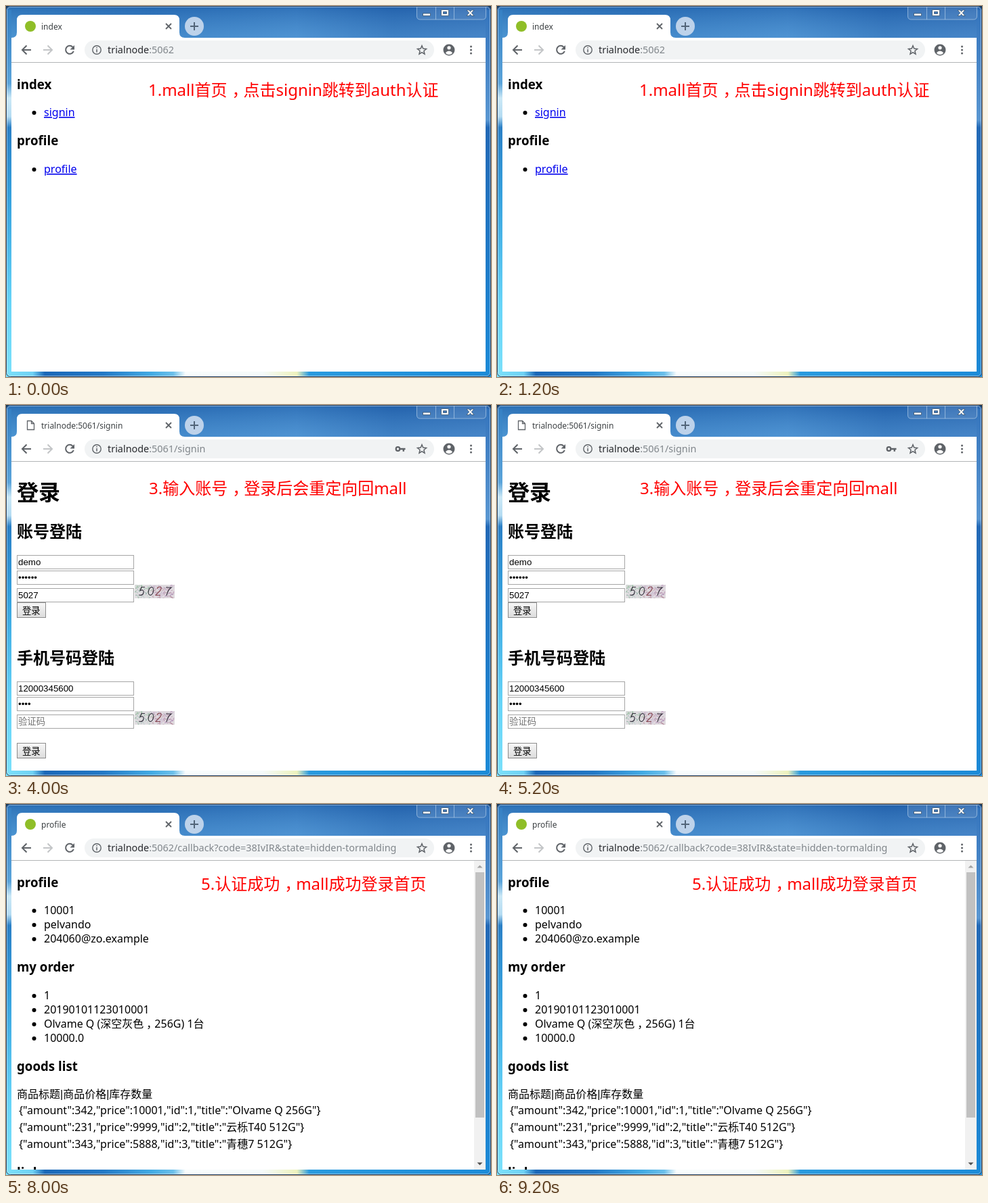
Write an HTML page that moves like this. It is 716 by 549 pixels and loops after 10 s.

```html
<!DOCTYPE html>
<html lang="zh-CN">
<head>
<meta charset="utf-8">
<title>Sign-in walkthrough</title>
<style>
html, body { margin: 0; width: 100%; height: 100%; overflow: hidden; background: #16324f; }
svg { display: block; width: 716px; height: 549px; }
text { font: 16px "Noto Sans", "Noto Sans CJK SC", "Noto Sans CJK", sans-serif; fill: #000; white-space: pre; }
.tab { font-size: 12px; fill: #3c4043; }
.url { font-size: 14.4px; fill: #80868b; }
.url tspan { fill: #27292d; }
.note { font-size: 24px; fill: #f00; }
.h1 { font-size: 32px; font-weight: 700; }
.h2 { font-size: 24px; font-weight: 700; }
.h3 { font-size: 18.72px; font-weight: 700; }
.link { fill: #00e; text-decoration: underline; }
.bar { font-family: "Liberation Sans", sans-serif; }
.field { font: 13.33px "Liberation Sans", "Noto Sans CJK SC", sans-serif; }
.hint { fill: #757575; }
.icon { fill: none; stroke: #5f6368; stroke-width: 1.8; }
.step, .pair { visibility: hidden; animation: step 10s calc(var(--at) * 1s - 10s) infinite step-end; }
.pair { animation-name: pair; }
@keyframes step { 0% { visibility: visible; } 20%, 100% { visibility: hidden; } }
@keyframes pair { 0% { visibility: visible; } 40%, 100% { visibility: hidden; } }
</style>
</head>
<body>
<svg viewBox="0 0 716 549">
  <defs>
    <linearGradient id="top">
      <stop offset="0" stop-color="#3a86c8"/><stop offset=".3" stop-color="#3179c0"/>
      <stop offset=".6" stop-color="#3f86ca"/><stop offset=".8" stop-color="#2c6fb8"/>
      <stop offset="1" stop-color="#3575bd"/>
    </linearGradient>
    <linearGradient id="shade" x2="0" y2="1">
      <stop offset="0" stop-color="#0a3f8c" stop-opacity=".3"/><stop offset="1" stop-color="#8cc8f4" stop-opacity=".2"/>
    </linearGradient>
    <linearGradient id="left" x2="0" y2="1">
      <stop offset="0" stop-color="#3580c4"/><stop offset=".2" stop-color="#5ba4da"/>
      <stop offset=".24" stop-color="#cbe8f6"/><stop offset=".29" stop-color="#b5dcf2"/>
      <stop offset=".32" stop-color="#2b80c6"/><stop offset=".5" stop-color="#35a0dd"/>
      <stop offset=".8" stop-color="#66d4f8"/><stop offset="1" stop-color="#7be0fa"/>
    </linearGradient>
    <linearGradient id="right" x2="0" y2="1">
      <stop offset="0" stop-color="#3575bd"/><stop offset=".3" stop-color="#5a97d2"/>
      <stop offset=".32" stop-color="#2369b6"/><stop offset="1" stop-color="#1c8bd8"/>
    </linearGradient>
    <linearGradient id="base">
      <stop offset="0" stop-color="#7be0fa"/><stop offset=".055" stop-color="#70d2f4"/>
      <stop offset=".08" stop-color="#1b68b8"/><stop offset=".2" stop-color="#2379c6"/>
      <stop offset=".3" stop-color="#43abe4"/><stop offset=".345" stop-color="#6cc0ea"/>
      <stop offset=".37" stop-color="#f8fcfd"/><stop offset=".53" stop-color="#f5fafa"/>
      <stop offset=".6" stop-color="#edf2bd"/><stop offset=".625" stop-color="#2a9bdf"/>
      <stop offset="1" stop-color="#1c8bd8"/>
    </linearGradient>
    <linearGradient id="fade">
      <stop offset="0" stop-color="#fff" stop-opacity="0"/><stop offset="1" stop-color="#fff"/>
    </linearGradient>
    <linearGradient id="face" x2="0" y2="1">
      <stop offset="0" stop-color="#f7f7f7"/><stop offset="1" stop-color="#dcdcdc"/>
    </linearGradient>
    <clipPath id="page"><rect x="8" y="84" width="700" height="457"/></clipPath>
    <clipPath id="title"><rect x="52" y="16" width="175" height="28"/></clipPath>
    <clipPath id="codeBox"><rect width="59" height="20"/></clipPath>

    <circle id="badge" cx="36" cy="30" r="8" fill="#8fbe28"/>
    <path id="sheet" class="icon" style="stroke-width:1.3" d="M31.5 23.5h6l4 4v9h-10zM37.5 23.5v4h4"/>
    <path id="star" class="icon" style="stroke-width:1.5" d="M614 58.8l1.8 4.3 4.7.4-3.6 3 1.1 4.6-4-2.5-4 2.5 1.1-4.6-3.6-3 4.7-.4z"/>
    <rect id="input" x="16.5" width="172" height="20" fill="#fff" stroke="#a5a5a5"/>
    <rect id="button" x="16.5" width="42" height="22" fill="url(#face)" stroke="#8c8c8c"/>
    <circle id="dot" cx="41.5" r="3"/>
    <g id="code" clip-path="url(#codeBox)">
      <rect width="59" height="20" fill="#dfdbdf"/>
      <g id="noise"></g>
      <g fill="none" stroke="#383440" stroke-width="1.2">
        <path d="M15 3.500h-5l-2 5c4-1.500 6 0 5 3.500s-4 4-7 3"/>
        <ellipse cx="24" cy="9.500" rx="3.500" ry="6" transform="rotate(16 24 9.500)"/>
        <path stroke="#864851" d="M33 6c1-4 7-4 6 0-1 4-6 6-8 9.500h7"/>
        <path d="M46 4h8c-4 3-6 7-7 12"/>
      </g>
    </g>
  </defs>

  <!-- window frame -->
  <rect width="716" height="549" rx="6" fill="url(#top)"/>
  <rect width="716" height="47" rx="6" fill="url(#shade)"/>
  <rect y="6" width="8" height="543" fill="url(#left)"/>
  <rect x="708" y="6" width="8" height="543" fill="url(#right)"/>
  <rect y="541" width="716" height="8" fill="url(#base)"/>
  <rect x=".5" y=".5" width="715" height="548" rx="6" fill="none" stroke="#1d3c60"/>
  <rect x="1.500" y="1.500" width="713" height="546" rx="5" fill="none" stroke="#fff" opacity=".45"/>
  <path d="M606.500 1v14q0 5 5 5h92q5 0 5-5V1M634.500 1v19M661.500 1v19" fill="#fff" fill-opacity=".1" stroke="#b6d0ea" stroke-opacity=".65"/>
  <g fill="#fff" stroke="#38536f" stroke-width=".8">
    <rect x="615.500" y="11" width="11" height="3.500"/>
    <path fill-rule="evenodd" d="M642.500 5.500h11v9h-11zM645.500 8.500v3h5v-3z"/>
    <path d="M680 6h3.500l2 2.300 2-2.300h3.500l-3.700 4.200 3.700 4.300h-3.500l-2-2.400-2 2.400H680l3.700-4.300z"/>
  </g>

  <!-- browser bar -->
  <path d="M8 47q8 0 8-8V21q0-8 8-8h224q8 0 8 8v18q0 8 8 8h444v494H8z" fill="#fff"/>
  <path d="M8 83.500h700" stroke="#b2b4b6"/>
  <circle cx="278" cy="30" r="14" fill="#bdd2ea"/>
  <path d="M278 24v12M272 30h12" stroke="#526579" stroke-width="2"/>
  <path class="icon" d="M236 26l8 8M244 26l-8 8"/>
  <rect x="116" y="51" width="516" height="28" rx="14" fill="#f1f3f4"/>
  <path class="icon" style="stroke-width:2" d="M37 65H24M30.500 58.500L24 65l6.500 6.500"/>
  <path class="icon" style="stroke-width:2;stroke:#c3c5c7" d="M55 65h13M61.500 58.500L68 65l-6.500 6.500"/>
  <path class="icon" style="stroke-width:2" d="M98.500 60.700a6 6 0 1 0 1.300 6"/>
  <path d="M101 58v6.500h-6.500z" fill="#5f6368"/>
  <circle class="icon" style="stroke-width:1.4" cx="134" cy="65" r="6.200"/>
  <path d="M134 64v4.500M134 61v1.600" stroke="#5f6368" stroke-width="1.5"/>
  <use href="#star"/>
  <circle cx="654" cy="65" r="8.500" fill="#5f6368"/>
  <circle cx="654" cy="61.800" r="2.600" fill="#fff"/>
  <path d="M648.800 69.500q2-3 5.200-3t5.200 3q-2 2.500-5.200 2.500t-5.200-2.500z" fill="#fff"/>
  <g fill="#5f6368"><circle cx="686.500" cy="60" r="1.500"/><circle cx="686.500" cy="65" r="1.500"/><circle cx="686.500" cy="70" r="1.500"/></g>

  <!-- shop home -->
  <g class="step" style="--at:0">
    <use href="#badge"/>
    <text class="tab" x="52" y="35">index</text>
    <text class="url" x="150" y="70"><tspan>trialnode</tspan>:5062</text>
    <text class="h3" x="16" y="123">index</text>
    <use href="#dot" y="158"/><text class="link" x="56" y="163">signin</text>
    <text class="h3" x="16" y="206">profile</text>
    <use href="#dot" y="242"/><text class="link" x="56" y="247">profile</text>
    <text class="note" x="210" y="133">1.mall首页<tspan dx="7">，</tspan><tspan dx="-7">点击signin跳转到auth认证</tspan></text>
  </g>

  <!-- sign-in form -->
  <g class="pair" style="--at:2">
    <use href="#sheet"/>
    <text class="tab" x="52" y="35">trialnode:5061/signin</text>
    <text class="url" x="150" y="70"><tspan>trialnode</tspan>:5061/signin</text>
    <text class="h1" x="16" y="141">登录</text>
    <text class="h2" x="16" y="195.500">账号登陆</text>
    <use href="#input" y="222.500"/><text class="field" x="18" y="237">demo</text>
    <use href="#input" y="245.500"/><text class="field" x="18" y="260">••••••</text>
    <use href="#input" y="271.500"/>
    <use href="#code" x="190" y="266"/>
    <use href="#button" y="292.500"/><text class="field" x="24" y="308.500">登录</text>
    <text class="h2" x="16" y="382.500">手机号码登陆</text>
    <use href="#input" y="409.500"/><text class="field" x="18" y="424">12000345600</text>
    <use href="#input" y="432.500"/><text class="field" x="18" y="447">••••</text>
    <use href="#input" y="458.500"/><text class="field hint" x="18" y="473">验证码</text>
    <use href="#code" x="190" y="453"/>
    <use href="#button" y="500.500"/><text class="field" x="24" y="516.500">登录</text>
  </g>
  <g class="step" style="--at:2">
    <text class="field hint" x="18" y="286">验证码</text>
    <text class="note" x="211" y="129">2.auth系统登录页</text>
  </g>
  <g class="step" style="--at:4">
    <text class="field" x="18" y="286">5027</text>
    <circle class="icon" style="stroke-width:2.200" cx="578.500" cy="65" r="2.800"/>
    <path class="icon" style="stroke-width:2.400" d="M581.500 65h8M586.800 65v3.800"/>
    <text class="note" x="211" y="132">3.输入账号<tspan dx="7">，</tspan><tspan dx="-7">登录后会重定向回mall</tspan></text>
  </g>

  <!-- consent -->
  <g class="step" style="--at:6">
    <use href="#badge"/>
    <g clip-path="url(#title)"><text class="tab" x="52" y="35">trialnode:5061/guard/authorize</text></g>
    <rect x="204" y="18" width="24" height="24" fill="url(#fade)"/>
    <text class="url" x="150" y="70"><tspan>trialnode</tspan>:5061/guard/authorize?response_type=code&amp;client_id...</text>
    <text class="h1" x="16" y="139" style="font-size:33.6px">Guard Approval</text>
    <text x="16" y="186">应用名 : client</text>
    <text x="16" y="207">申请权限 :</text>
    <text x="16" y="228">scope.read</text>
    <g fill="#f0f0f0" stroke="#a0a0a0"><circle cx="27" cy="242" r="5.600"/><circle cx="118" cy="242" r="5.600"/></g>
    <circle cx="27" cy="242" r="3" fill="#4c4c4c"/>
    <text x="37" y="249">Approve</text><text x="128" y="249">Deny</text>
    <use href="#button" y="253.500"/><text class="field" x="24" y="269.500">提交</text>
    <text class="note" x="287" y="130">4.对mall申请的权限授权</text>
  </g>

  <!-- profile -->
  <g class="step" style="--at:8" clip-path="url(#page)">
    <text class="h3" x="16" y="123">profile</text>
    <use href="#dot" y="158"/><text x="56" y="163">10001</text>
    <use href="#dot" y="179"/><text x="56" y="184">pelvando</text>
    <use href="#dot" y="200"/><text x="56" y="205">204060@zo.example</text>
    <text class="h3" x="16" y="248">my order</text>
    <use href="#dot" y="284"/><text x="56" y="289">1</text>
    <use href="#dot" y="305"/><text x="56" y="310">20190101123010001</text>
    <use href="#dot" y="326"/><text x="56" y="331">Olvame Q (深空灰色<tspan dx="4">，</tspan><tspan dx="-4">256G) 1台</tspan></text>
    <use href="#dot" y="347"/><text x="56" y="352">10000.0</text>
    <text class="h3" x="16" y="395">goods list</text>
    <text x="16" y="435">商品标题<tspan class="bar">|</tspan>商品价格<tspan class="bar">|</tspan>库存数量</text>
    <text x="19" y="459">{"amount":342,"price":10001,"id":1,"title":"Olvame Q 256G"}</text>
    <text x="19" y="484">{"amount":231,"price":9999,"id":2,"title":"云栎T40 512G"}</text>
    <text x="19" y="509">{"amount":343,"price":5888,"id":3,"title":"青穗7 512G"}</text>
    <text class="h3" x="16" y="552">link</text>
    <rect x="691" y="84" width="17" height="457" fill="#f1f1f1"/>
    <rect x="693" y="101" width="13" height="363" fill="#c1c1c1"/>
    <path d="M695.500 94.500l4-4 4 4z" fill="#a3a3a3"/>
    <path d="M695.500 530.500l4 4 4-4z" fill="#505050"/>
    <text class="note" x="288" y="127">5.认证成功<tspan dx="7">，</tspan><tspan dx="-7">mall成功登录首页</tspan></text>
  </g>
  <g class="step" style="--at:8">
    <use href="#badge"/>
    <text class="tab" x="52" y="35">profile</text>
    <text class="url" x="150" y="70"><tspan>trialnode</tspan>:5062/callback?code=38IvIR&amp;state=hidden-tormalding</text>
  </g>
</svg>
<script>
// Fine coloured scratches behind the check code
let seed = 7;
const rnd = n => (seed = seed * 16807 % 2147483647) / 2147483647 * n;
const noise = document.getElementById('noise');
for (let i = 0; i < 150; i++) {
  const line = document.createElementNS('http://www.w3.org/2000/svg', 'path');
  const x = rnd(62) - 2, y = rnd(20);
  const hue = x < 24 ? 120 + rnd(50) : 270 + rnd(80);
  line.setAttribute('d', `M${x} ${y}l${rnd(12) - 6} ${rnd(12) - 6}`);
  line.setAttribute('stroke', `hsl(${hue} 22% ${52 + rnd(36)}%)`);
  line.setAttribute('stroke-width', '.7');
  noise.append(line);
}
</script>
</body>
</html>
```
